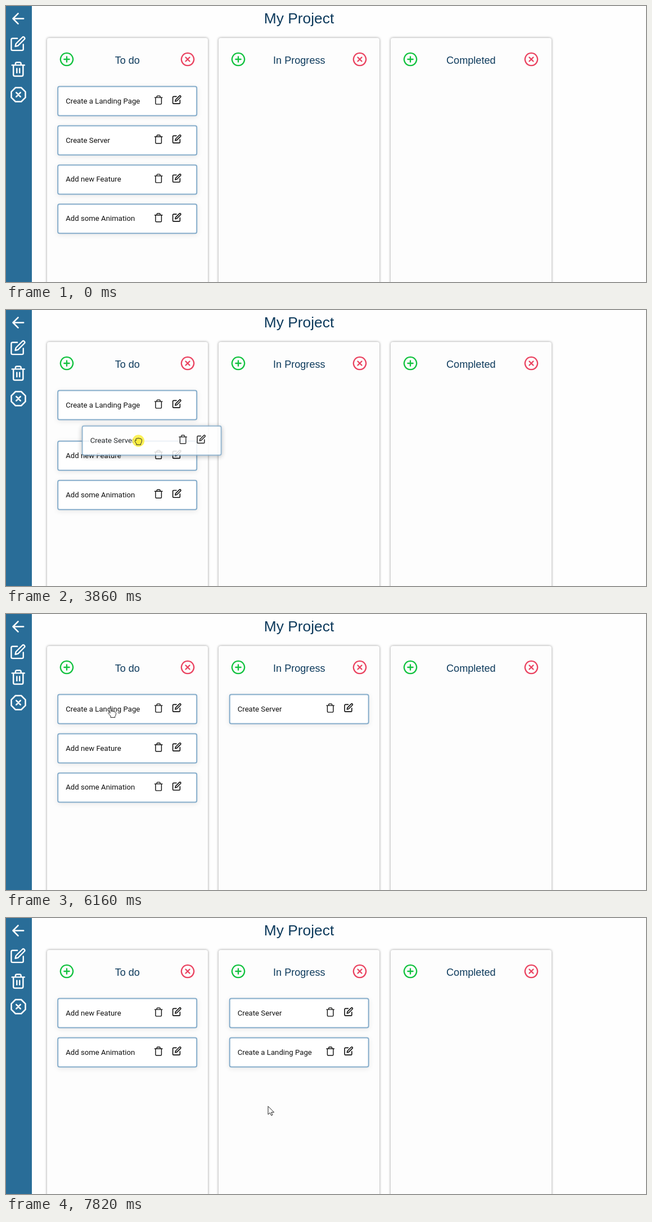
These frames come from a looping animation (1138x492 px, 8000 ms). An HTML page:

```html
<!DOCTYPE html>
<html lang="en">
<head>
<meta charset="utf-8">
<title>Board</title>
<style>
  html, body { margin: 0; width: 100%; height: 100%; overflow: hidden; background: #fefefe; }
  #stage { position: relative; width: 1138px; height: 492px; overflow: hidden; }
  #stage div, svg { position: absolute; box-sizing: border-box; }
  svg { fill: none; stroke-linecap: round; stroke-linejoin: round; overflow: visible; }
  .bar { left: 0; top: 0; width: 46px; height: 492px; background: #296d98; }
  .head { color: #0d3a5c; text-align: center; white-space: nowrap;
    font-family: "Liberation Sans", Arial, sans-serif; }
  .title { left: 421px; top: 2px; width: 200px; font-size: 26.4px; line-height: 40px; }
  .column { top: 57px; width: 286px; height: 460px; border-radius: 4px; background: #fdfdfd;
    box-shadow: 0 0 4px rgba(0, 0, 0, .42); }
  .column .head { left: 43px; top: 24.7px; width: 200px; font-size: 18.1px; line-height: 30px; }
  .card { left: 0; top: 0; width: 249px; height: 53.6px; padding-left: 13px;
    border: 2px solid #86adcb; border-radius: 4px; background: #fff; color: #111;
    box-shadow: 0 2px 10px rgba(0, 0, 0, .09); white-space: nowrap;
    font: 13.2px/49.6px Roboto, sans-serif; }
  .card.held { opacity: .85; z-index: 2; box-shadow: 0 2px 9px rgba(0, 0, 0, .3); }
  #cursor { left: 0; top: 0; width: 1px; height: 1px; z-index: 3; }
</style>
</head>
<body>
<div id="stage">
  <div class="bar"></div>
  <div class="head title">My Project</div>
  <svg id="cursor">
    <circle r="10.7" fill="#fbee3c" fill-opacity=".85"/>
    <path id="shape" stroke="#222" stroke-width="1"/>
  </svg>
</div>
<script>
const LOOP = 8000, PITCH = 305.5, ROW = 69.9, W = 249, H = 53.6;
const stage = document.getElementById('stage');
const cursor = document.getElementById('cursor');
const shape = document.getElementById('shape');
const glow = cursor.querySelector('circle');

const ring = 'M12 2.5a9.5 9.5 0 1 0 .01 0z';
const can = 'M3 6h18M19 6v14a2 2 0 0 1-2 2H7a2 2 0 0 1-2-2V6M8 6V4a2 2 0 0 1 2-2h4a2 2 0 0 1 2 2v2';
const icons = {
  back: 'M19.5 12H5M12 19l-7-7 7-7',
  edit: 'M11 4H4a2 2 0 0 0-2 2v14a2 2 0 0 0 2 2h14a2 2 0 0 0 2-2v-7M18.5 2.5a2.1 2.1 0 0 1 3 3L12 15l-4 1 1-4z',
  bin: can,
  binLines: can + 'M10 11v6M14 11v6',
  octagon: 'M7.9 2h8.2L22 7.9v8.2L16.1 22H7.9L2 16.1V7.9zM15 9l-6 6M9 9l6 6',
  plus: ring + 'M12 8v8M8 12h8',
  cross: ring + 'M15 9l-6 6M9 9l6 6'
};
const pointers = {
  arrow: 'M0 -1V13.2L3.3 10.2 5.8 15 8 14 5.7 9.3H10.2Z',
  open: 'M-4.5 8V6C-6 3-8 1-7.5-.5C-7-1.8-5.5-1-4.5.5L-5.8-4.5C-6-6.3-4-6.7-3.5-5L-2.6-1.5-2.8-7' +
    'C-2.7-8.8-.7-8.8-.5-7L-.2-1.8.8-6.8C1.2-8.4 3.2-8 3-6.2L2.4-1.3 4.4-4.5C5.3-5.8 6.8-4.8 6.3-3.3' +
    'C5 0 5.5 3 3.8 6V8Z',
  fist: 'M-3.5 6.5V5C-5 3-6.5 1.5-6-.4C-5.6-1.6-4.6-1.4-4-.6L-4.6-2.8C-4.6-4.6-2.6-5-1.9-3.7' +
    'C-1.5-5.6.6-5.6 1-3.9C1.6-5.2 3.4-4.9 3.6-3.3C4.6-4.2 6-3.4 6-1.8C6 1 5.6 3.2 4.2 5V6.5Z',
  point: 'M-3 8V6C-5 3-7 2-7.2.6C-7.3-.8-5.5-.8-4 1L-4.5-6.5C-4.6-8.6-2.3-8.6-2.1-6.7L-1.6-2' +
    'C-1-3.6 1-3.4 1.2-1.8C2-3 3.6-2.6 3.9-1.2C5-2 6.6-1.2 6.6.4C6.6 3.2 6 5 4.8 6.5V8Z'
};

function div(parent, cls, text = '') {
  const el = document.createElement('div');
  el.className = cls;
  el.textContent = text;
  parent.append(el);
  return el;
}

function icon(parent, name, cx, cy, size, color, width = 2) {
  parent.insertAdjacentHTML('beforeend',
    `<svg viewBox="0 0 24 24" width="${size}" height="${size}" stroke="${color}" stroke-width="${width}"
      style="left:${cx - size / 2}px;top:${cy - size / 2}px"><path d="${icons[name]}"/></svg>`);
}

const bar = stage.querySelector('.bar');
icon(bar, 'back', 21.5, 22.6, 31, '#fff');
icon(bar, 'edit', 21.6, 67.4, 28.5, '#fff');
icon(bar, 'binLines', 21.6, 112.5, 29.5, '#fff');
icon(bar, 'octagon', 21.6, 157.8, 30, '#fff');

['To do', 'In Progress', 'Completed'].forEach((name, i) => {
  const col = div(stage, 'column');
  col.style.left = 72.8 + i * PITCH + 'px';
  div(col, 'head', name);
  icon(col, 'plus', 35.2, 38, 28, '#12c23f');
  icon(col, 'cross', 250.5, 38, 28, '#ea4360');
});

// Each card: its start row, and the drags that lift it or shift it up.
const cards = ['Create a Landing Page', 'Create Server', 'Add new Feature', 'Add some Animation']
  .map((text, row) => {
    const el = div(stage, 'card', text);
    icon(el, 'bin', 177.6, 22.5, 18, '#111', 1.9);
    icon(el, 'edit', 210, 22.5, 17, '#111', 2.3);
    return { el, row, x: 0, y: 0 };
  });

const drags = [
  { card: 1, press: 3600, lift: 3700, drop: 4330, grab: [192, 240], to: [PITCH, -ROW] },
  { card: 0, press: 6470, lift: 6560, drop: 7220, grab: [195, 179], to: [PITCH, ROW] }
];

// time, x, y
const path = [
  [520, 421, 484], [1060, 168, 234], [1290, 168, 234], [1910, 158, 300], [2060, 157, 310],
  [2400, 160, 346], [2850, 149, 227], [3160, 150, 234], [3600, 192, 240], [3770, 192, 240],
  [4090, 452, 205], [4280, 505, 204], [4390, 505, 204], [4640, 323, 253], [5470, 190, 183],
  [5930, 190, 183], [6160, 189, 176], [6410, 189, 176], [6480, 195, 179], [6560, 195, 179],
  [7120, 471, 244], [7190, 500, 249], [7280, 500, 249], [7820, 466, 337]
];

const clamp = v => Math.min(1, Math.max(0, v));
const ease = v => { v = clamp(v); return v * v * (3 - 2 * v); };

// Monotone cubic through the path, one axis at a time.
function slope(i, k) {
  const a = path[i], b = path[i + 1];
  return a && b ? (b[k] - a[k]) / (b[0] - a[0]) : 0;
}
function tangent(i, k) {
  const l = slope(i - 1, k), r = slope(i, k);
  return l * r > 0 ? 2 * l * r / (l + r) : 0;
}
function along(t, k) {
  const last = path.length - 1;
  if (t <= path[0][0]) return path[0][k];
  if (t >= path[last][0]) return path[last][k];
  const i = path.findIndex(p => p[0] > t) - 1;
  const a = path[i], b = path[i + 1], h = b[0] - a[0], u = (t - a[0]) / h;
  return a[k] + (b[k] - a[k]) * u * u * (3 - 2 * u)
    + h * u * (1 - u) * ((1 - u) * tangent(i, k) - u * tangent(i + 1, k));
}
const at = t => [along(t, 1), along(t, 2)];

function place(card, index, t) {
  let x = 91.2, y = 142.6 + card.row * ROW, held = false;
  for (const d of drags) {
    if (d.card === index) {
      const p = at(Math.min(t, d.drop)), home = ease((t - d.drop) / 200);
      const move = p.map((v, k) => t < d.lift ? 0 : (v - d.grab[k]) * (1 - home) + d.to[k] * home);
      x += move[0];
      y += move[1];
      held = held || t >= d.press && t < d.drop + 200;
    } else if (card.row > d.card && index > 1) {
      y -= ROW * ease((t - d.lift) / 250);
    }
  }
  card.x = x;
  card.y = y;
  card.el.style.transform = `translate(${x}px,${y}px)`;
  card.el.classList.toggle('held', held);
}

function draw(t) {
  cards.forEach((c, i) => place(c, i, t));
  const [x, y] = at(t);
  const pressed = drags.some(d => t >= d.press && t < d.drop);
  const over = cards.some(c => x > c.x && x < c.x + W && y > c.y && y < c.y + H);
  const kind = pressed ? 'fist' : !over ? 'arrow' : t >= 5930 && t < 6470 ? 'point' : 'open';
  cursor.style.display = t < 520 ? 'none' : '';
  cursor.style.transform = `translate(${x}px,${y}px)`;
  glow.style.display = pressed ? '' : 'none';
  shape.setAttribute('d', pointers[kind]);
  shape.setAttribute('fill', pressed ? '#fbee3c' : '#fff');
}

function tick() {
  draw(performance.now() % LOOP);
  requestAnimationFrame(tick);
}
tick();
</script>
</body>
</html>
```
